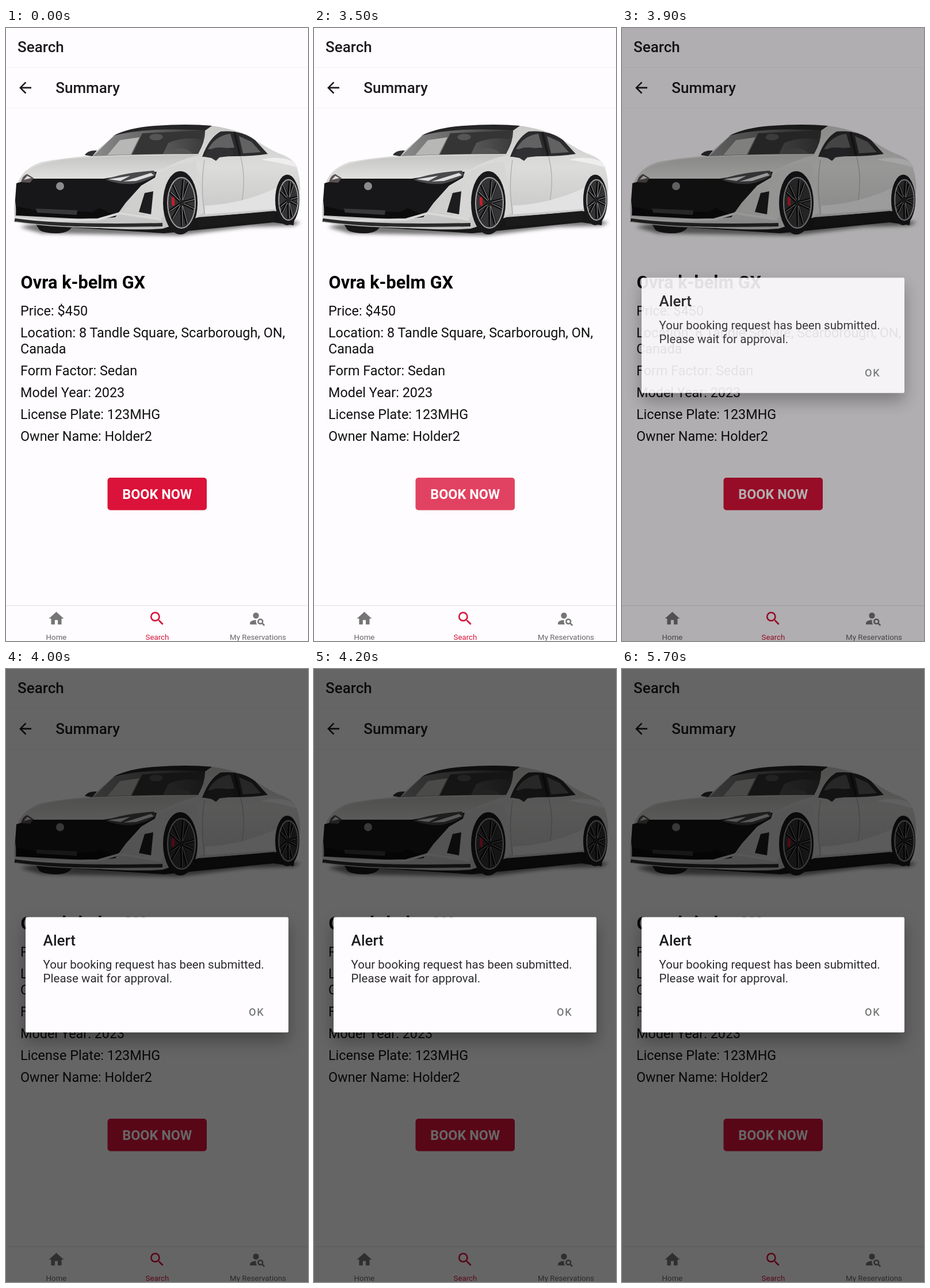
Animation, 525 px wide and 1066 px high, one loop 5800 ms. Source, as an HTML page:

```html
<!DOCTYPE html>
<html lang="en">
<head>
<meta charset="utf-8">
<title>Booking summary</title>
<style>
html, body { margin: 0; width: 100%; height: 100%; overflow: hidden; background: #fefcfe; }
svg { display: block; width: 100%; height: 100%; }
text { font-family: Roboto, Arial, sans-serif; font-size: 23.4px; fill: #111; }
.head { font-size: 26px; font-weight: 500; fill: #1c1b1e; }
.name { font-size: 30.7px; font-weight: 700; fill: #000; }
.tab { font-size: 13.3px; text-anchor: middle; fill: #666; }
.icon { fill: #757575; }
.on { fill: #d5143b; }
.book { font-weight: 700; fill: #fff; text-anchor: middle; }
.note { font-size: 20.5px; fill: #2b2a2d; }
.ok { font-size: 18.2px; font-weight: 500; letter-spacing: 1.6px; fill: #777a78; }
#dialog { filter: drop-shadow(0 14px 14px rgba(0, 0, 0, .32)); }
</style>
</head>
<body>
<svg viewBox="0 0 525 1066" preserveAspectRatio="none">
  <defs>
    <linearGradient id="paint" x2="0" y2="1">
      <stop offset="0" stop-color="#c9c9c7"/><stop offset=".4" stop-color="#dcdcdb"/><stop offset="1" stop-color="#c2c2c2"/>
    </linearGradient>
    <linearGradient id="hood" x2="0" y2="1">
      <stop offset="0" stop-color="#c3c3c1"/><stop offset="1" stop-color="#e0e0de"/>
    </linearGradient>
    <linearGradient id="glass">
      <stop offset="0" stop-color="#8b8b8b"/><stop offset=".4" stop-color="#6c6c6c"/><stop offset="1" stop-color="#3a3a3b"/>
    </linearGradient>
    <filter id="soft" x="-10%" y="-60%" width="120%" height="220%"><feGaussianBlur stdDeviation="3"/></filter>
  </defs>

  <path d="M0 68.5H525M0 139.5H525" stroke="#f3f1f3"/>
  <text class="head" x="20" y="42">Search</text>
  <path d="M20 11H7.83l5.59-5.59L12 4l-8 8 8 8 1.41-1.41L7.83 13H20z" transform="translate(17.8 88.2) scale(1.31)" fill="#1c1b1e"/>
  <text class="head" x="86.3" y="113">Summary</text>

  <g id="car">
    <path d="M24 346L62 357 180 359 300 361 420 346 500 344 512 338 470 330 330 338 60 338Z" fill="#777" filter="url(#soft)"/>
    <path d="M50 338L58 351Q66 357 90 357 108 356 114 347L275 357 465 338 500 343 505 300 60 300Z" fill="#171717"/>
    <path d="M15 331Q12 305 20 270 30 243 62 233 100 226 148 222 172 200 190 186 208 176 250 171 310 166 358 170 400 176 425 189 450 207 474 218 496 225 504 238 513 262 511 285L505 312 466 319 335 329 272 349Q220 353 120 345 50 341 15 331Z" fill="url(#paint)"/>
    <path d="M38 248Q55 235 100 229 150 223 250 222L338 220Q300 229 273 246L170 262 48 262Z" fill="url(#hood)"/>
    <path d="M262 257Q285 235 330 232L345 320 332 328 330 280Q318 245 290 253 276 262 273 330L240 330Z" fill="#d6d6d5"/>
    <path d="M187 187Q215 173 260 170 315 166 358 170L345 179Q275 173 187 187Z" fill="#252526"/>
    <path d="M151 223L188 187Q245 172 346 178 347 196 334 219 240 219 151 223Z" fill="url(#glass)"/>
    <path d="M176 221L198 195 232 190 217 220Z" fill="#b7b7b6"/>
    <path d="M219 220L237 183 346 178 340 194Q310 188 282 200L273 219Z" fill="#353536"/>
    <path d="M284 218Q288 208 303 209 317 210 324 218ZM249 190q2-6 12-6 11 0 12 6-4 6-12 5-9 1-12-5z" fill="#555"/>
    <path d="M341 224Q353 191 373 180 409 177 433 195L455 219Q430 223 398 223Z" fill="#2b2b2d"/>
    <path d="M351 211Q364 187 390 184L397 208ZM405 188L427 198 443 216 412 218Z" fill="#626263"/>
    <path d="M397 181L407 222" stroke="#1a1a1b" stroke-width="4"/>
    <path d="M345 224Q349 211 365 208 388 206 396 215L394 222 371 225 365 231 357 226ZM137 221Q142 212 158 213L150 223Z" fill="#303032"/>
    <path d="M345 229Q338 275 345 323M408 224Q418 262 409 307M345 323L410 307 468 302" fill="none" stroke="#aaa" stroke-width="1.2"/>
    <path d="M346 309Q410 306 470 278L468 315 346 324Z" fill="#e2e2e2"/>
    <path d="M443 229Q475 221 499 232L508 243Q486 236 443 229Z" fill="#eee"/>
    <path d="M334 330L467 318 466 336 334 345Z" fill="#1a1a1b"/>

    <path d="M18 270L46 262 170 262 240 251 262 250 259 260 235 274 208 304 190 329 150 333 18 321 16 300Z" fill="#171719"/>
    <path d="M173 264Q200 252 257 248L261 255Q248 266 222 271 199 273 173 264Z" fill="#4a4a4c"/>
    <path d="M178 263L216 257 199 266ZM204 267L252 252 257 256 226 266Z" fill="#dedede"/>
    <path d="M26 268Q29 256 37 254L48 261 42 269Z" fill="#5a5253"/>
    <path d="M31 264L37 257 44 261Z" fill="#ddd"/>
    <circle cx="94" cy="275" r="7" fill="#8c8c8e"/>
    <path d="M203 320L231 286 257 283 253 324 236 324Z" fill="#cfcfce"/>
    <path d="M231 320L241 287 256 284 252 324Z" fill="#1d1d1f"/>
    <path d="M18 310L50 317 150 320 163 313 190 326 150 333 17 326Z" fill="#0c0c0d"/>
    <path d="M52 314L124 317 123 325 54 321Z" fill="#38383a"/>
    <path d="M15 329L60 335 160 333 198 322 270 333" fill="none" stroke="#d9d9d8" stroke-width="4"/>
    <path d="M15 334Q100 346 272 342" fill="none" stroke="#2a2a2b" stroke-width="6"/>
    <path d="M16 337Q100 350 270 347" fill="none" stroke="#bdbdbd" stroke-width="1.5"/>
    <g id="wheels"></g>
  </g>

  <text class="name" x="25.6" y="453">Ovra k-belm GX</text>
  <g id="facts"></g>
  <g id="button">
    <rect x="176.5" y="782" width="172.5" height="56.5" rx="5" fill="#db1239"/>
    <text class="book" x="262.8" y="819">BOOK NOW</text>
  </g>

  <path d="M0 1004.5H525" stroke="#e1dfe1"/>
  <path class="icon" d="M10 20v-6h4v6h5v-8h3L12 3 2 12h3v8z" transform="translate(72 1011.5) scale(1.29)"/>
  <path class="icon on" d="M15.5 14h-.79l-.28-.27A6.47 6.47 0 0 0 16 9.5 6.5 6.5 0 1 0 9.5 16c1.61 0 3.09-.59 4.23-1.57l.27.28v.79l5 4.99L20.49 19zm-6 0a4.5 4.5 0 1 1 0-9 4.5 4.5 0 1 1 0 9z" transform="translate(247 1011.3) scale(1.3)"/>
  <g class="icon" transform="translate(421.5 1011.3) scale(1.3)">
    <circle cx="10" cy="8" r="4"/>
    <path d="M10.35 14.01C7.62 13.91 2 15.27 2 18v2h9.54c-2.47-2.76-1.23-5.89-1.19-5.99z"/>
    <path d="M19.43 18.02A4 4 0 1 0 16 20c.74 0 1.43-.22 2.02-.57L20.59 22 22 20.59zM16 18a2 2 0 1 1 0-4 2 2 0 1 1 0 4z"/>
  </g>
  <text class="tab" x="87.5" y="1063.5">Home</text>
  <text class="tab on" x="263" y="1063.5">Search</text>
  <text class="tab" x="438" y="1063.5">My Reservations</text>

  <rect id="dim" width="525" height="1066"/>
  <g id="dialog">
    <rect x="34" y="431.5" width="457" height="200.5" rx="2.5" fill="#fefcff"/>
    <text class="head" x="64.6" y="481">Alert</text>
    <text class="note" x="64.6" y="521">Your booking request has been submitted.</text>
    <text class="note" x="64.6" y="545">Please wait for approval.</text>
    <text class="ok" x="422" y="603">OK</text>
  </g>
</svg>
<script>
const $ = id => document.getElementById(id);

const facts = [
  [500, 'Price: $450'],
  [538, 'Location: 8 Tandle Square, Scarborough, ON,'],
  [566, 'Canada'],
  [604, 'Form Factor: Sedan'],
  [642, 'Model Year: 2023'],
  [680, 'License Plate: 123MHG'],
  [718, 'Owner Name: Holder2']
];
$('facts').innerHTML = facts.map(([y, s]) => `<text x="25" y="${y}">${s}</text>`).join('');

// Five split spokes in a foreshortened rim
function wheel(x, y, rx, ry, caliper) {
  let spokes = '';
  for (let i = 0; i < 5; i++) {
    for (const d of [-.2, .2]) {
      const a = i * Math.PI * .4 - 1.2 + d;
      spokes += `M0 0L${Math.cos(a) * rx * .74} ${Math.sin(a) * ry * .74}`;
    }
  }
  return `<g transform="translate(${x} ${y})">
    <ellipse rx="${rx}" ry="${ry}" fill="#19191b"/>
    <ellipse cx="2" rx="${rx * .8}" ry="${ry * .8}" fill="#343436" stroke="#a5a5a6" stroke-width="2"/>
    ${caliper ? '<path d="M-15-10l5-1v17l-5-2z" fill="#c21e2c"/>' : ''}
    <path transform="translate(2 0)" d="${spokes}" stroke="#0d0d0e" stroke-width="5"/>
    <path transform="translate(3 0)" d="${spokes}" stroke="#8b8b8d" stroke-width="1.2"/>
    <ellipse cx="2" rx="4" ry="6" fill="#222"/></g>`;
}
$('wheels').innerHTML = wheel(303, 304, 30, 55, true) + wheel(489, 299, 21, 44);

// Linear interpolation through [time, value] points
function track(t, points) {
  let [t0, v0] = points[0];
  for (const [t1, v1] of points) {
    if (t < t1) return t <= t0 ? v0 : v0 + (v1 - v0) * (t - t0) / (t1 - t0);
    [t0, v0] = [t1, v1];
  }
  return v0;
}
const easeInOut = p => p < .5 ? 2 * p * p : 1 - 2 * (1 - p) ** 2;

const LOOP = 5800, STEP = 100;
const start = performance.now();

function draw(now) {
  const ms = Math.max(0, now - start) % LOOP;
  const t = Math.floor(ms / STEP) * STEP;
  const release = easeInOut(track(t, [[3340, 0], [3590, 1]]));
  $('button').setAttribute('opacity', t < 3200 ? 1 : .2 + .8 * release);
  $('dim').setAttribute('opacity', track(t, [[3799, 0], [3800, .035], [3900, .31], [4000, .595]]));
  $('dialog').setAttribute('opacity', track(t, [[3799, 0], [3800, .03], [3900, .89], [4000, 1]]));
  $('dialog').setAttribute('transform', `translate(0 ${track(t, [[3800, 25], [3900, 2.8], [4000, 0]])})`);
  requestAnimationFrame(draw);
}
draw(start);
</script>
</body>
</html>
```
